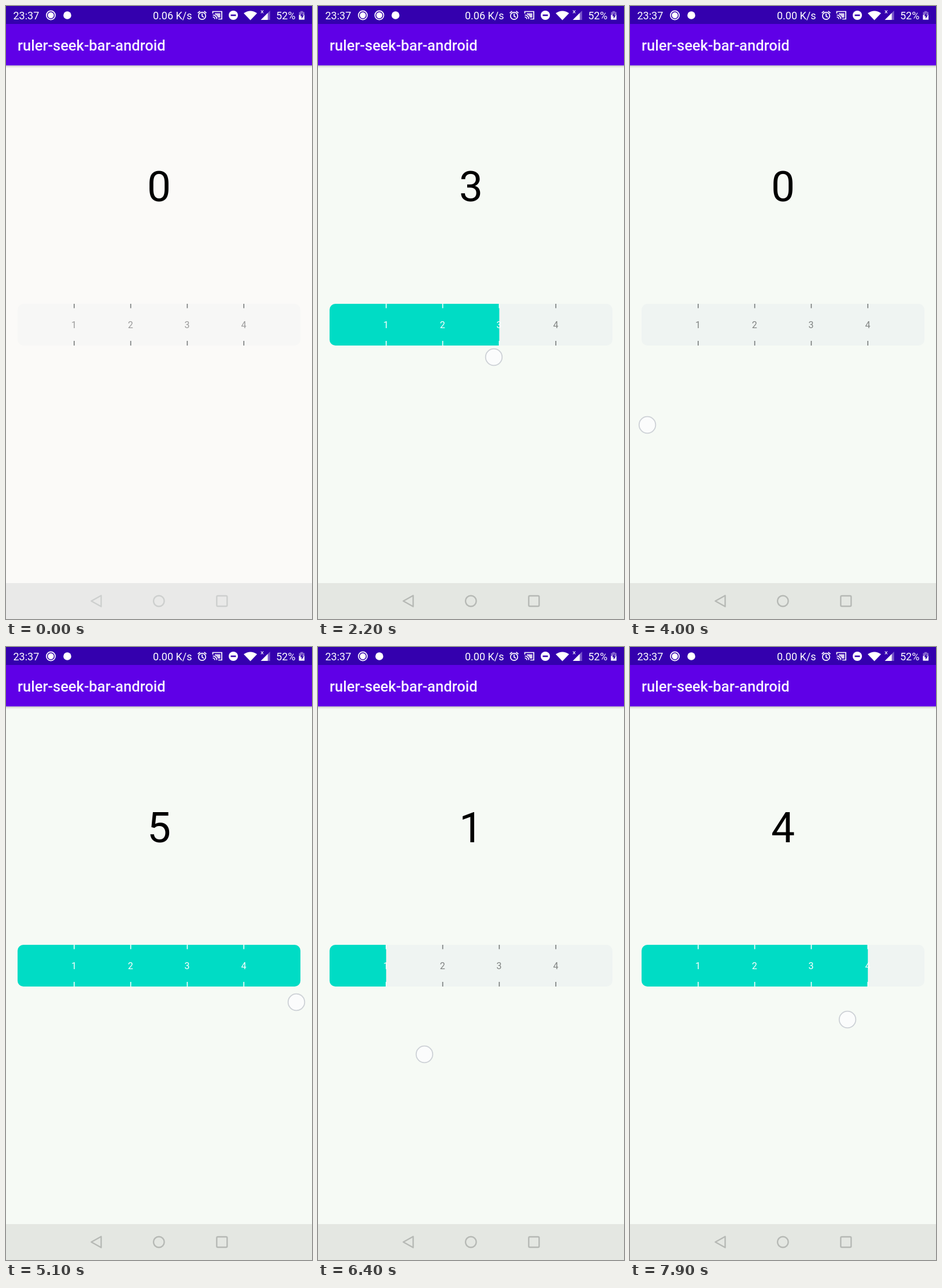
Recreate the animation shown at these times as an HTML page. Size 529 by 1058 pixels, loop 8 s.

```html
<!DOCTYPE html>
<html lang="en">
<head>
<meta charset="utf-8">
<title>ruler-seek-bar-android</title>
<style>
  html, body { margin: 0; width: 100%; height: 100%; overflow: hidden; background: #f6faf5; }
  svg { display: block; width: 100vw; height: 100vh; font-family: Roboto, sans-serif; }
  .status { fill: #fff; font-size: 18px; }
  .line { fill: none; stroke: #fff; stroke-width: 1.7; }
  .nav { fill: none; stroke-width: 2.4; stroke-linejoin: round; }
  .label { font-size: 16px; text-anchor: middle; }
</style>
</head>
<body>
<svg viewBox="0 0 529 1058" preserveAspectRatio="none">
  <defs>
    <linearGradient id="shade" x2="0" y2="1">
      <stop offset="0" stop-color="#000" stop-opacity=".2"/>
      <stop offset="1" stop-color="#000" stop-opacity="0"/>
    </linearGradient>
    <clipPath id="filled"><rect id="fillClip" x="20" y="514" width="0" height="72"/></clipPath>
    <g id="record">
      <circle r="7.6" class="line" stroke-width="1.5"/>
      <circle r="5.2" fill="#fff"/>
    </g>
  </defs>

  <rect id="page" width="529" height="1058"/>
  <rect y="102" width="529" height="5" fill="url(#shade)"/>
  <rect y="30" width="529" height="72.5" fill="#5f00e7"/>
  <rect width="529" height="31" fill="#3400ae"/>

  <g class="status">
    <text x="12.5" y="22.5">23:37</text>
    <use href="#record" x="77.5" y="16"/>
    <use href="#record" id="secondRecord" x="106" y="16"/>
    <circle id="badge" cy="16" r="6.8"/>
    <text id="speed" x="254" y="22.5"></text>

    <g class="line">
      <circle cx="339" cy="17" r="6.2"/>
      <path d="M339 13v4.5l3 2M331.5 12.2l4-3.4M346.500 12.2l-4-3.4"/>
      <path d="M357.500 13v-3.500h15.500v13h-6M357.500 15.500a7 7 0 0 1 7 7M357.500 19a3.500 3.500 0 0 1 3.500 3.500"/>
    </g>
    <path d="M361 12.500h9.500v7.500h-4a9 9 0 0 0-5.500-5.500z" opacity=".8"/>
    <circle cx="393" cy="16" r="8"/>
    <rect x="388.500" y="14.700" width="9" height="2.600" fill="#3400ae"/>
    <path d="M411 12.500q11.500-8 23 0L422.500 24.500z"/>
    <path d="M456.500 8v16h-16z" opacity=".35"/>
    <path d="M452.500 12v12h-12z"/>
    <path d="M440.800 7.500l4 5m0-5l-4 5" class="line" style="stroke-width:1.2"/>
    <text x="467" y="22.500">52%</text>
    <path d="M509 10.500v-1.800h4.500v1.800h2.500v13h-9.500v-13z" opacity=".4"/>
    <path d="M506.500 15.500h9.500v8h-9.500z"/>
    <path d="M512.500 11.500l-4 6h2.500v4.500l4-6h-2.500z" fill="#3400ae"/>
  </g>
  <text x="20" y="77" font-size="25.600" font-weight="500" fill="#f7f2ff">ruler-seek-bar-android</text>

  <text id="number" x="264.500" y="336.500" font-size="73" text-anchor="middle"></text>

  <rect id="track" x="20" y="514" width="489" height="72" rx="10"/>
  <rect x="20" y="514" width="489" height="72" rx="10" fill="#00dcc5" clip-path="url(#filled)"/>
  <g id="marks"></g>

  <rect id="navBar" y="996" width="529" height="62"/>
  <g id="navIcons" class="nav">
    <path d="M147.500 1027l17-9.500v19z"/>
    <circle cx="264.300" cy="1027" r="9.300"/>
    <rect x="364.300" y="1018" width="18" height="18" rx="2"/>
  </g>

  <circle id="touch" r="14.300" fill="#fcfcfd" fill-opacity=".85" stroke="#cdd1d6" stroke-width="1.800"/>
</svg>

<script>
const LOOP = 8000, STEP = 100, LAG = 100;
const LEFT = 20, UNIT = 97.8;
const HELD = [100, 1200, 1800, 2000, 2100, 3500, 5000, 7500];

// Finger path: time, x, y
const PATH = [
  [200, 28, 585], [900, 70, 588], [1300, 137, 592], [2200, 304, 606],
  [3000, 486, 612], [3300, 488, 615], [3900, 40, 712], [4000, 30, 723],
  [4100, 45, 712], [4400, 250, 630], [4800, 480, 624], [5100, 502, 613],
  [5300, 470, 628], [5800, 30, 735], [5900, 14, 748], [6100, 30, 742],
  [6400, 184, 703], [6800, 486, 668], [7400, 480, 662], [7600, 460, 655],
  [7900, 376, 643]
];

const $ = id => document.getElementById(id);
const lerp = (a, b, k) => a + (b - a) * k;
const mix = (a, b, k) => `rgb(${a.map((v, i) => Math.round(lerp(v, b[i], k)))})`;

function fingerAt(t) {
  const next = PATH.findIndex(p => p[0] > t);
  if (next < 0) return PATH[PATH.length - 1].slice(1);
  if (next === 0) return PATH[0].slice(1);
  const a = PATH[next - 1], b = PATH[next];
  const k = (t - a[0]) / (b[0] - a[0]);
  return [lerp(a[1], b[1], k), lerp(a[2], b[2], k)];
}

function valueAt(t) {
  const [x] = fingerAt(t - LAG);
  return Math.max(0, Math.min(5, Math.round((x - LEFT) / UNIT)));
}

$('marks').innerHTML = [1, 2, 3, 4].map(n => {
  const x = LEFT + n * UNIT;
  return `<g><path d="M${x} 514v7.500M${x} 578v8" stroke-width="1.600"/>
    <text class="label" x="${x - 0.3}" y="556">${n}</text></g>`;
}).join('');
const marks = [...$('marks').children];

function draw(t) {
  const value = valueAt(t);
  const tint = Math.min(1, t / 2200);
  const sharp = Math.min(1, t / 1000);
  const [x, y] = fingerAt(t);
  const recording = t >= 600 && t < 3200;

  $('page').setAttribute('fill', mix([251, 250, 248], [246, 250, 245], tint));
  $('navBar').setAttribute('fill', mix([233, 233, 232], [228, 231, 226], tint));
  $('navIcons').setAttribute('stroke', mix([205, 207, 206], [182, 185, 181], sharp));
  $('track').setAttribute('fill', mix([247, 247, 246], [239, 244, 242], sharp));

  $('secondRecord').style.display = recording ? '' : 'none';
  $('badge').setAttribute('cx', recording ? 134 : 106);
  $('speed').textContent = t < 3200 ? '0.06 K/s' : '0.00 K/s';

  $('number').textContent = value;
  $('fillClip').setAttribute('width', value * UNIT);
  marks.forEach((mark, i) => {
    const covered = i < value;
    mark.setAttribute('stroke', 'none');
    mark.firstChild.setAttribute('stroke', covered ? '#fff' : '#777b7b');
    mark.setAttribute('fill', covered ? '#fff' : mix([155, 155, 155], [128, 131, 130], sharp));
  });

  $('touch').style.display = t < 200 ? 'none' : '';
  $('touch').setAttribute('cx', x);
  $('touch').setAttribute('cy', y);
}

let start;
function tick(now) {
  start ??= now;
  let t = Math.floor((now - start) % LOOP / STEP) * STEP;
  while (HELD.includes(t)) t -= STEP;
  draw(t);
  requestAnimationFrame(tick);
}
draw(0);
requestAnimationFrame(tick);
</script>
</body>
</html>
```
